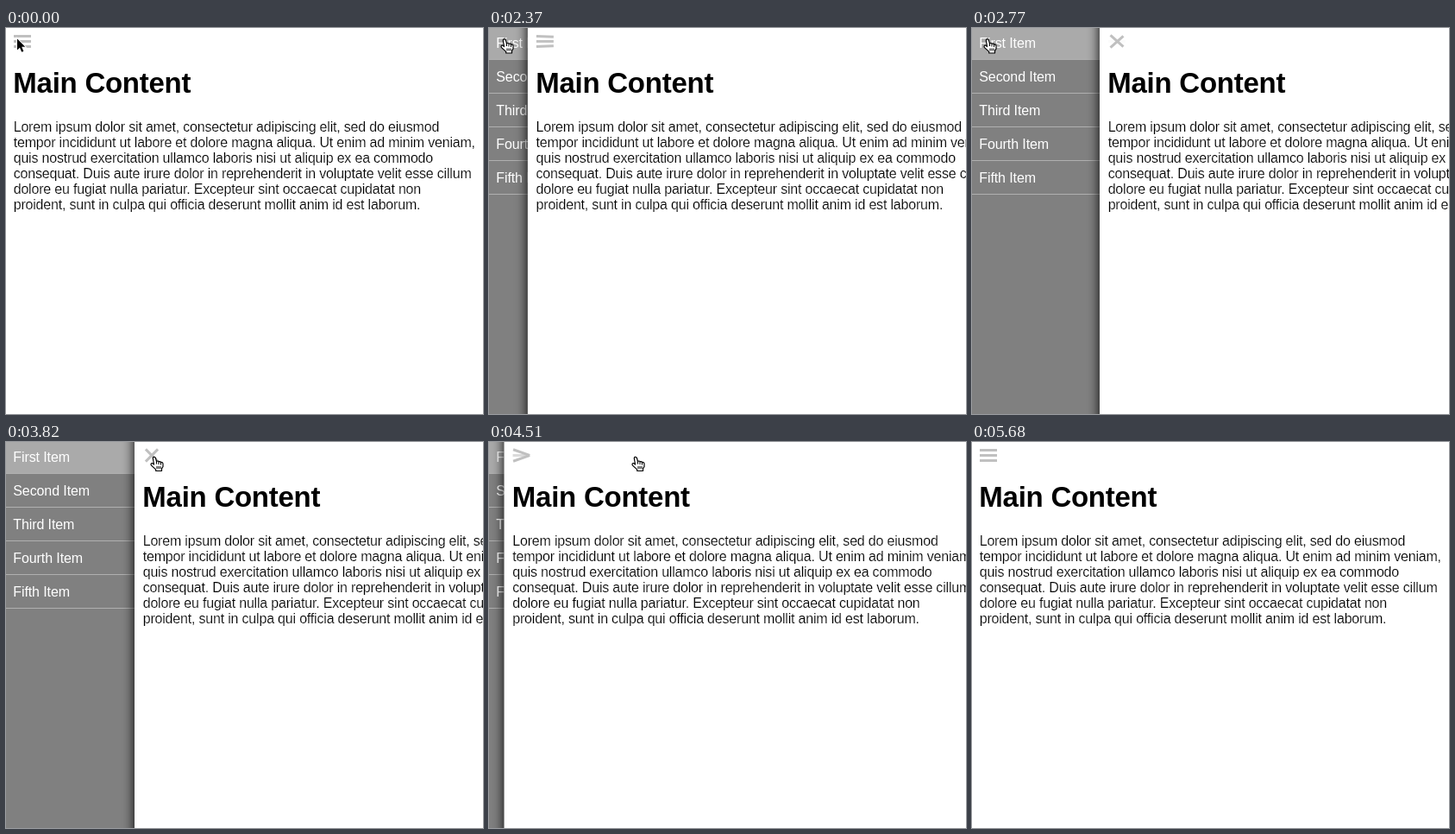
An HTML page that plays this animation: 553x447 px, repeating every 6140 ms.

```html
<!DOCTYPE html>
<html lang="en">
<head>
<meta charset="utf-8">
<title>Slide-out menu</title>
<style>
  html, body { margin: 0; width: 100%; height: 100%; overflow: hidden; background: #fff; }
  svg { display: block; }
  text { font: 16px "Liberation Sans", Arial, sans-serif; letter-spacing: -.19px; }
  #main text { stroke: #fff; stroke-width: .22px; }
  #main .title { font-size: 33px; font-weight: bold; letter-spacing: -.25px; stroke: none; }
  #menu text { fill: #fff; letter-spacing: -.1px; }
  .page { fill: #fff; filter: drop-shadow(0 0 7px #000); }
  .bar { fill: #c0c0c0; }
</style>
</head>
<body>
<svg width="553" height="447" viewBox="0 0 553 447">
  <g id="menu">
    <rect width="200" height="447" fill="#808080"/>
    <rect width="200" height="37" fill="#aaa"/>
  </g>
  <g id="main">
    <rect class="page" x="-1" y="-40" width="600" height="527"/>
    <rect class="bar" x="-10" y="-1.5" width="20" height="3"/>
    <rect class="bar" x="-10" y="-1.5" width="20" height="3"/>
    <rect class="bar" x="-10" y="-1.5" width="20" height="3"/>
    <text class="title" x="8.3" y="75">Main Content</text>
  </g>
  <path id="arrow" d="M0 0V13L3 10.2 5.2 15.3 7.4 14.4 5.2 9.3H9.2Z" stroke="#fff" paint-order="stroke" stroke-width="1.8"/>
  <g id="hand" stroke="#000" stroke-width="1.2" stroke-linejoin="round">
    <path fill="#fff" d="M4 9.5 2.9 3Q2.6 1 4 .8T6 2.2L7 6Q8.8 4.9 9.5 6.3 11.3 5.5 12 7 14.2 6.6 14.5 9V12L13 14.4V17H6.2V15.4L1 10.6Q0 9 1.2 8.3T4 9.5Z"/>
    <path fill="none" stroke-width="1" d="M7 6V9M9.5 6.5V9.5M12 7V10M7.5 11.5V14.5M9.5 11.5V14.5M11.5 11.5V14.5"/>
  </g>
</svg>
<script>
const LOOP = 6140, OPEN = 2321, CLOSE = 4288, SLIDE = 670, MENU_WIDTH = 150;
const $ = id => document.getElementById(id);
const menu = $('menu'), main = $('main'), arrow = $('arrow'), hand = $('hand');
const bars = main.querySelectorAll('.bar');

function add(parent, tag, attrs, text = '') {
  const el = document.createElementNS('http://www.w3.org/2000/svg', tag);
  for (const key in attrs) el.setAttribute(key, attrs[key]);
  el.textContent = text;
  parent.append(el);
}

['First', 'Second', 'Third', 'Fourth', 'Fifth'].forEach((name, i) => {
  add(menu, 'text', { x: 8.3, y: 23 + 39 * i }, name + ' Item');
  add(menu, 'rect', { y: 36 + 39 * i, width: 200, height: 1, fill: '#b0b0b0' });
});

[
  'Lorem ipsum dolor sit amet, consectetur adipiscing elit, sed do eiusmod',
  'tempor incididunt ut labore et dolore magna aliqua. Ut enim ad minim veniam,',
  'quis nostrud exercitation ullamco laboris nisi ut aliquip ex ea commodo',
  'consequat. Duis aute irure dolor in reprehenderit in voluptate velit esse cillum',
  'dolore eu fugiat nulla pariatur. Excepteur sint occaecat cupidatat non',
  'proident, sunt in culpa qui officia deserunt mollit anim id est laborum.'
].forEach((line, i) => add(main, 'text', { x: 8.7, y: 120 + 18 * i }, line));

const clamp = v => Math.min(1, Math.max(0, v));

function bezier(x1, y1, x2, y2) {
  const at = (a, b, s) => 3 * (1 - s) ** 2 * s * a + 3 * (1 - s) * s * s * b + s ** 3;
  return x => {
    let lo = 0, hi = 1;
    for (let i = 0; i < 24; i++) {
      const mid = (lo + hi) / 2;
      if (at(x1, x2, mid) < x) lo = mid; else hi = mid;
    }
    return at(y1, y2, hi);
  };
}
const easeOut = bezier(.23, 1, .32, 1);
const ease = bezier(.25, .1, .25, 1);

// 0 = closed, 1 = open
function openness(t, curve) {
  if (t < OPEN) return 0;
  return t < CLOSE ? curve(clamp((t - OPEN) / SLIDE)) : 1 - curve(clamp((t - CLOSE) / SLIDE));
}

const move = (el, x, y, extra = '') => el.setAttribute('transform', `translate(${x} ${y}) ${extra}`);
const show = (el, on) => el.setAttribute('visibility', on ? 'visible' : 'hidden');

function drawCursor(t) {
  const inCorner = t >= 5570 && t < 5680;
  show(arrow, t < 1960 || inCorner);
  move(arrow, inCorner ? 540 : 13, inCorner ? 434 : 12.5);

  show(hand, t >= 1960 && t < 4920);
  const u = clamp((t - 3130) / 630), k = u * u * (3 - 2 * u);
  move(hand, 13.5 + 154 * k - (t >= 4000 ? 2 : 0), 12 + 4.5 * k - 10 * Math.sin(Math.PI * k));
}

function draw(t) {
  move(main, MENU_WIDTH * openness(t, easeOut), 0);
  const cross = openness(t, ease);
  move(bars[0], 19, 9.5 + 6 * cross, `rotate(${45 * cross})`);
  move(bars[1], 19, 15.5);
  bars[1].setAttribute('opacity', 1 - cross);
  move(bars[2], 19, 21.5 - 6 * cross, `rotate(${-45 * cross})`);
  drawCursor(t);
}

const start = performance.now();
function tick() {
  draw((performance.now() - start) % LOOP);
  requestAnimationFrame(tick);
}
tick();
</script>
</body>
</html>
```
